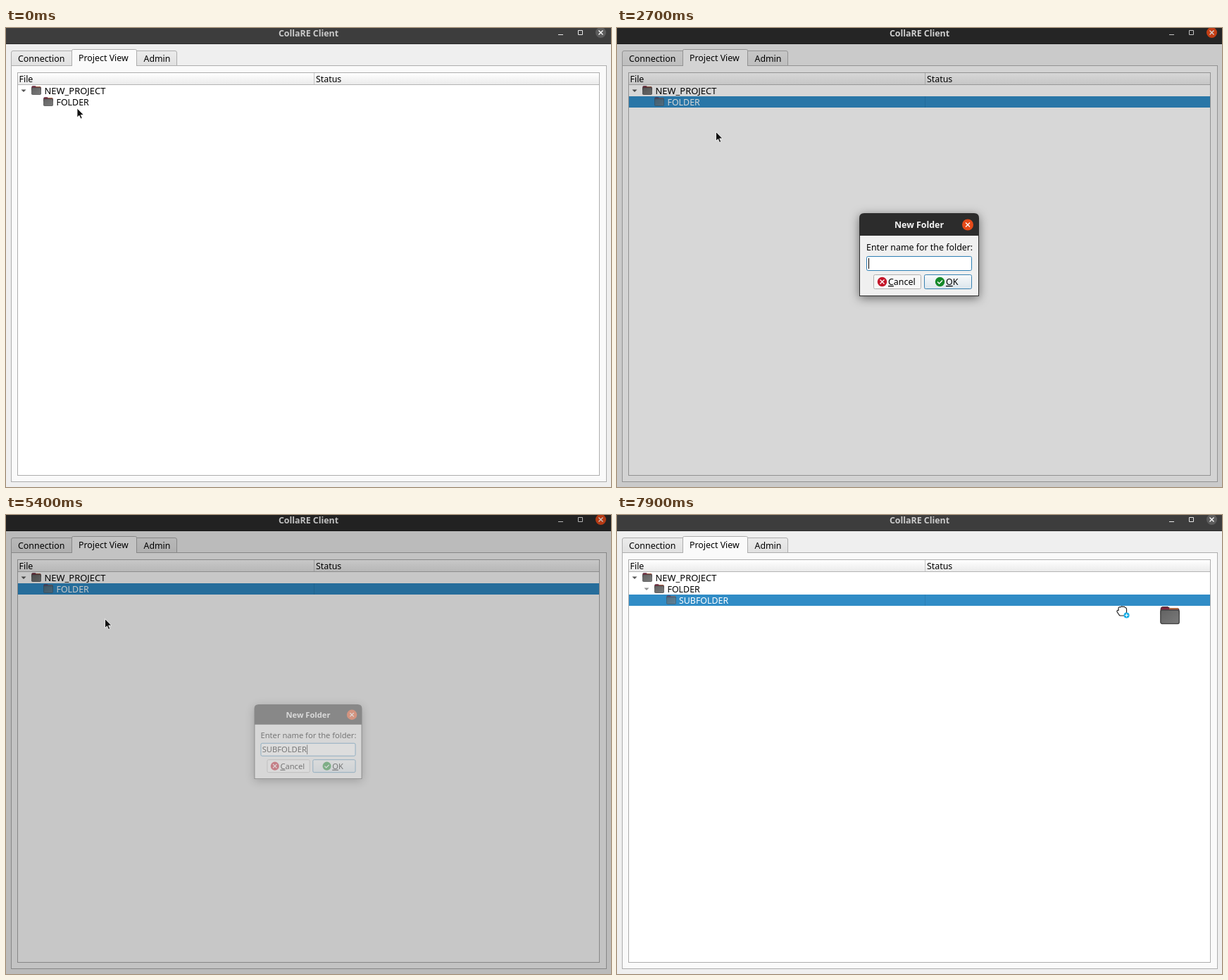
Recreate the animation shown at these times as an HTML page. Size 859 by 652 pixels, loop 8 s.

```html
<!DOCTYPE html>
<html lang="en">
<head>
<meta charset="utf-8">
<title>CollaRE Client</title>
<style>
  html, body { margin: 0; width: 859px; height: 652px; overflow: hidden; }
  svg { display: block; font: 12.4px "Noto Sans", "Open Sans", sans-serif; }
  .bold { font-weight: bold; text-anchor: middle; }
  .key { text-decoration: underline; }
  .cross { stroke: #fff; stroke-width: 1.3; fill: none; }
  #bar { fill: #3d3d3d; }
  #title { fill: #cbcbcb; }
  #close { fill: #5c5c5c; }
  .active #bar { fill: #2c2c2c; }
  .active #title { fill: #f6f6f6; }
  .active #close { fill: #e64a19; }
  .selected text { fill: #fff; }
  .selected use { opacity: .65; }
  #dialog { transform-origin: 429px 322px; filter: drop-shadow(0 3px 7px rgba(0, 0, 0, .5)); }
</style>
</head>
<body>
<svg id="stage" width="859" height="652" viewBox="0 0 859 652">
  <defs>
    <linearGradient id="head" x2="0" y2="1">
      <stop stop-color="#fff"/><stop offset="1" stop-color="#ebebeb"/>
    </linearGradient>
    <linearGradient id="tab" x2="0" y2="1">
      <stop stop-color="#ebebeb"/><stop offset="1" stop-color="#e1e1e1"/>
    </linearGradient>
    <linearGradient id="blueButton" x2="0" y2="1">
      <stop stop-color="#f8fafb"/><stop offset="1" stop-color="#dbe5ec"/>
    </linearGradient>
    <linearGradient id="metal" x2="1" y2="1">
      <stop stop-color="#626262"/><stop offset="1" stop-color="#7b7b7b"/>
    </linearGradient>
    <symbol id="folder" viewBox="0 0 28 26">
      <path d="M1 4Q1 1 4 1H11L14 3H25Q27 3 27 6V12H1Z" fill="#7c243b" stroke="#45303a"/>
      <path d="M13 3.5H26" stroke="#b06a42" stroke-width="2"/>
      <rect x=".8" y="5.5" width="26.4" height="19.5" rx="2.5" fill="url(#metal)" stroke="#454545" stroke-width="1.4"/>
    </symbol>
    <path id="x" d="M-3-3L3 3M3-3L-3 3"/>
    <path id="expander" d="M-3.5-1.5H3.5L0 2Z" fill="#555"/>
  </defs>

  <rect width="859" height="652" fill="#efefef"/>
  <rect id="bar" width="859" height="23"/>
  <path d="M0 22.5H859" stroke="#000" stroke-opacity=".3"/>
  <text id="title" class="bold" x="429.5" y="12">CollaRE Client</text>
  <path d="M784 9.5H791M812.5 3.5H818.5V9.5H812.5Z" fill="none" stroke="#e8e8e8"/>
  <circle id="close" cx="844.5" cy="6.5" r="7.5"/>
  <use href="#x" x="844.5" y="6.5" class="cross"/>

  <g stroke="#adadad">
    <rect x="7.5" y="53.5" width="845" height="591" fill="#fafafa"/>
    <path d="M7.5 53.5V35Q7.5 32.5 10 32.5H93.5V53.5ZM185.5 53.5V32.5H240Q242.5 32.5 242.5 35V53.5Z" fill="url(#tab)"/>
    <path d="M93.5 54V32.5Q93.5 30.5 95.5 30.5H183.5Q185.5 30.5 185.5 32.5V54" fill="#fafafa"/>
    <rect x="16.5" y="63.5" width="826" height="572" fill="#fff"/>
  </g>
  <rect x="17" y="64" width="825" height="16" fill="url(#head)"/>
  <path d="M17 80.5H842" stroke="#b4b4b4"/>
  <path d="M437.5 64V80" stroke="#c6c6c6"/>
  <text x="17" y="48">Connection</text>
  <text x="103" y="47">Project View</text>
  <text x="195.5" y="48">Admin</text>
  <text x="18.5" y="77">File</text>
  <text x="440" y="77">Status</text>

  <g id="selection">
    <rect x="17" width="825" height="16" fill="#308cc6"/>
    <path d="M437.5 0V16" stroke="#2a7fb6"/>
  </g>
  <use href="#expander" x="25" y="89"/>
  <use href="#folder" x="36" y="82" width="14" height="13"/>
  <text x="54.5" y="94" font-size="12.95">NEW_PROJECT</text>
  <g id="row1">
    <use href="#folder" x="53" y="98" width="14" height="13"/>
    <text x="71.5" y="110">FOLDER</text>
  </g>
  <g id="row2">
    <use href="#expander" x="42" y="105"/>
    <use href="#folder" x="70" y="114" width="14" height="13"/>
    <text x="88" y="126">SUBFOLDER</text>
  </g>

  <g id="menu">
    <rect x="97.5" y="86.5" width="160" height="112" fill="#fff" stroke="#8c8c8c"/>
    <path d="M147 93.5H254M208 128.5H254" stroke="#bdbdbd"/>
    <rect id="hover" x="98" y="136" width="159" height="21" fill="#308cc6"/>
    <text x="102" y="98">Project</text>
    <text x="121" y="116">Refresh</text>
    <text x="102" y="133">Folder operations</text>
    <text id="newItem" x="121" y="151">New Folder</text>
    <text x="121" y="172">Delete Folder</text>
    <text x="121" y="193">Rename</text>
    <circle cx="110.5" cy="111.5" r="6" fill="#31537d"/>
    <path d="M106 108Q109 105 111 107L110 111 107 112ZM111 112L115 110V114L112 117Z" fill="#b5c6d4"/>
    <use href="#folder" x="104" y="140" width="14" height="13"/>
    <g fill="#f3dada" stroke="#c9252b" stroke-width="2.4">
      <circle cx="110.5" cy="168" r="5.3"/><path d="M107 164.5L114 171.5"/>
    </g>
    <path d="M105.5 182.5H113L115.5 185V195.5H105.5Z" fill="#e9e4d9" stroke="#aaa69d"/>
    <path d="M107 186.5H112M107 189.5H114M107 192.5H114" stroke="#b5ab99"/>
  </g>

  <rect id="dim" width="859" height="652"/>

  <g id="dialog">
    <path d="M344 381V270Q344 263 351 263H507Q514 263 514 270V381Z" fill="#2c2c2c"/>
    <rect x="345" y="295" width="168" height="85" fill="#f0f0f0"/>
    <text class="bold" x="429" y="284" fill="#f6f6f6">New Folder</text>
    <circle cx="498" cy="279.5" r="8" fill="#e64a19"/>
    <use href="#x" x="498" y="279.5" class="cross"/>
    <text x="354" y="316">Enter name for the folder:</text>
    <rect x="354.5" y="324.5" width="149" height="20" rx="2" fill="#fff" stroke="#2d7fb4"/>
    <text id="entry" x="356.5" y="339"></text>
    <path id="caret" d="M.5 327V342" stroke="#000"/>
    <rect x="364.5" y="350.5" width="67" height="20" rx="2" fill="#f7f7f7" stroke="#b0b0b0"/>
    <rect x="436.5" y="350.5" width="67" height="20" rx="2" fill="url(#blueButton)" stroke="#3982b2"/>
    <circle cx="376.5" cy="360.5" r="6.7" fill="#c4162a"/>
    <use href="#x" x="376.5" y="360.5" class="cross"/>
    <circle cx="458.5" cy="360.5" r="6.7" fill="#15892a"/>
    <path d="M455 360.5L457.5 363 462 358.5" class="cross"/>
    <text x="385" y="365"><tspan class="key">C</tspan>ancel</text>
    <text x="467" y="365"><tspan class="key">O</tspan>K</text>
  </g>

  <path id="pointer" d="M0 0V13L3 10.3 5 15 7.2 14 5.2 9.5H9.3Z" fill="#111" stroke="#fff" stroke-width=".8"/>
  <g id="drag">
    <use href="#folder" x="771" y="129.5" width="28" height="26"/>
    <path d="M713 142L710 137.5Q709.5 135 712 135.5V132Q713 130 715 131Q716.5 129 718.5 130.5Q720.5 129.5 721.5 131.5Q723.5 131.5 723.5 134V138L721.5 143H714Z" fill="#fff" stroke="#222" stroke-width="1.2"/>
    <circle cx="723.5" cy="142.5" r="4" fill="#19aee8"/>
    <path d="M721.2 142.5H725.8M723.5 140.2V144.8" stroke="#fff"/>
  </g>
</svg>
<script>
const LOOP = 8000;
const $ = id => document.getElementById(id);
const show = (id, on) => { $(id).style.display = on ? "" : "none"; };
const during = (t, from, to) => t >= from && t < to;

// Value of the last [time, ...value] entry already reached.
const at = (steps, t) => steps.findLast(s => t >= s[0]).slice(1);

const pointerPath = [
  [0, 101, 114], [100, 101, 114.5], [300, 98, 104.5],
  [1600, 127.5, 132], [1700, 136, 153], [1800, 139, 152], [2000, 140.5, 147.5],
  [6100, 163, 145], [6200, 300, 126], [6300, 520, 85], [6400, 814, 1]
];
const dimming = [
  [0, 0], [2700, .155], [2800, .26], [3000, .31],
  [5400, .22], [5500, .118], [5600, .05], [5700, 0]
];
const typed = [
  [0, 0], [3500, 1], [3700, 2], [3900, 3], [4000, 4],
  [4200, 5], [4400, 7], [4600, 8], [4800, 9]
];
const dialogPose = [[0, 1, 0], [2400, .67, .4], [2700, 1, 1], [5400, .9, .4], [5500, 1, 0]];

function draw(t) {
  const created = t >= 5700, dragging = t >= 7900;
  const selected = during(t, 800, 5700);
  const hover = t >= 1700;
  $("stage").classList.toggle("active", during(t, 800, 7600));

  show("selection", selected || dragging);
  $("selection").setAttribute("transform", `translate(0 ${dragging ? 113 : 97})`);
  $("row1").classList.toggle("selected", selected);
  $("row2").classList.toggle("selected", dragging);
  show("row2", created);
  show("drag", dragging);

  show("menu", during(t, 1100, 2300));
  show("hover", hover);
  $("newItem").setAttribute("fill", hover ? "#fff" : "#000");

  $("dim").setAttribute("opacity", at(dimming, t)[0]);
  const [scale, opacity] = at(dialogPose, t);
  show("dialog", opacity > 0);
  $("dialog").style.transform = `scale(${scale})`;
  $("dialog").style.opacity = opacity;
  const entry = $("entry");
  entry.textContent = "SUBFOLDER".slice(0, at(typed, t)[0]);
  const end = entry.textContent ? entry.getComputedTextLength() : 0;
  $("caret").setAttribute("transform", `translate(${Math.round(356.5 + end)} 0)`);

  show("pointer", t < 6500);
  $("pointer").setAttribute("transform", `translate(${at(pointerPath, t)})`);
}

function tick() {
  draw(performance.now() % LOOP);
  requestAnimationFrame(tick);
}
tick();
</script>
</body>
</html>
```
